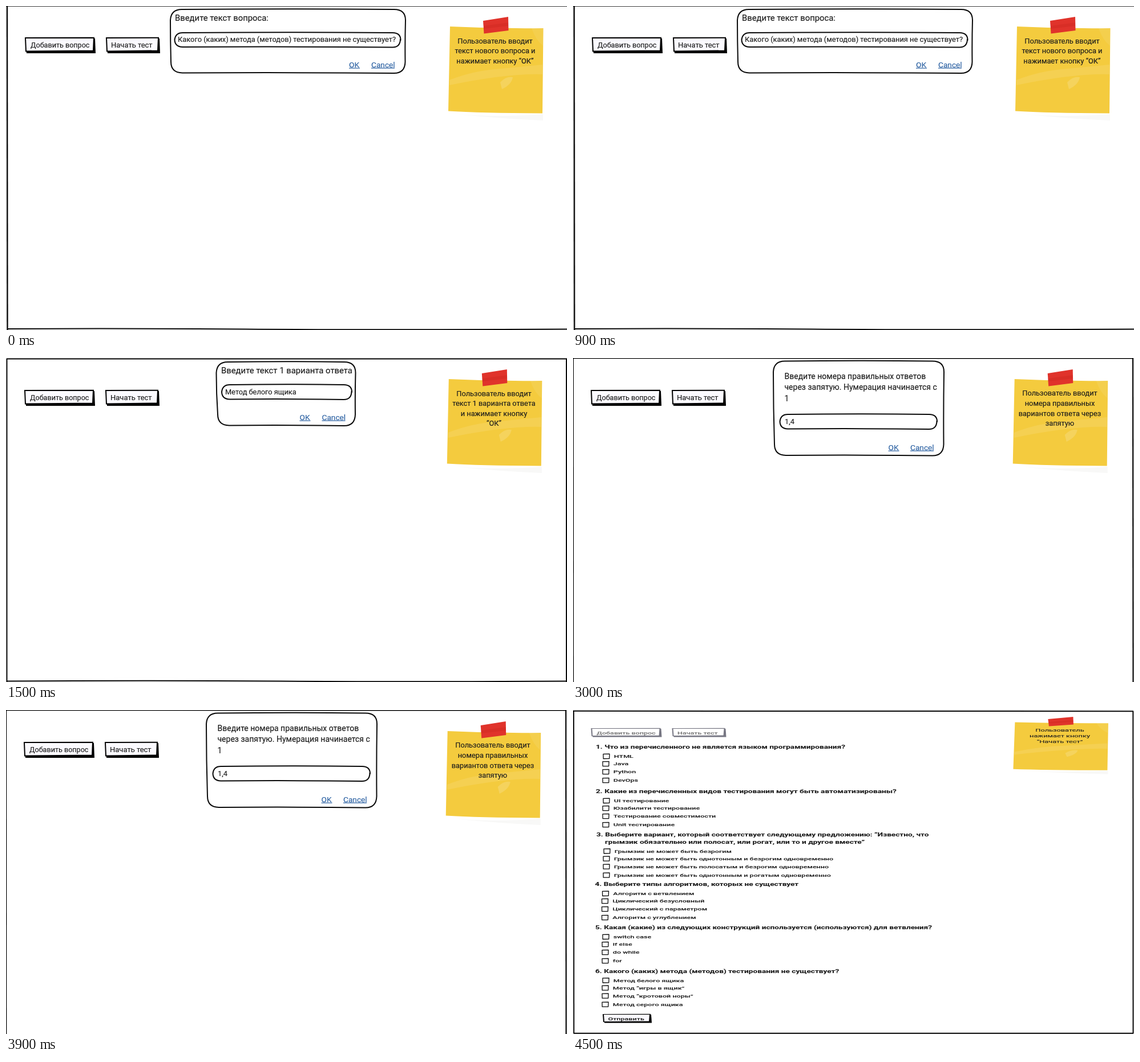
Animation of 983 by 569 pixels, one loop 6 s. Source, as an HTML page:

```html
<!DOCTYPE html>
<html lang="ru">
<head>
<meta charset="utf-8">
<title>Создание теста</title>
<style>
  html, body { margin: 0; width: 100%; height: 100%; overflow: hidden; background: #fff; }
  svg { display: block; width: 100%; height: 100%; }
  text { font-family: Roboto, "Open Sans", sans-serif; font-size: 12.8px; fill: #1c1c1c; stroke: #1c1c1c; stroke-width: .15px; white-space: pre; }
  .scene { visibility: hidden; animation: show 6s step-end infinite; }
  .scene:nth-of-type(2) { animation-delay: -4.5s; }
  .scene:nth-of-type(3) { animation-delay: -3s; }
  .scene:nth-of-type(4) { animation-delay: -1.5s; }
  @keyframes show { 0% { visibility: visible; } 25%, 100% { visibility: hidden; } }
  .line { fill: none; stroke: #0a0a0a; stroke-width: 2; stroke-linejoin: round; }
  .mid { text-anchor: middle; }
  .link { font-size: 13.7px; fill: #2d62a3; stroke: #2d62a3; }
  .bold { font-size: 13.65px; font-weight: 700; }
  .item { font-size: 12.55px; font-weight: 500; }
  .off { fill: #777; stroke: #777; }
</style>
</head>
<body>
<svg id="stage" viewBox="0 0 983 569" preserveAspectRatio="none"></svg>
<script>
(() => {
const FLAT = 0.553;      // vertical squeeze of the last screen
const FLAT_TEXT = 0.6;

const text = (x, y, s, cls = '', size = 0) =>
  `<text x="${x}" y="${y}" class="${cls}"${size ? ` style="font-size:${size}px"` : ''}>${s}</text>`;

const flatText = (x, y, s, cls) =>
  `<text transform="translate(${x} ${y}) scale(1 ${FLAT_TEXT})" class="${cls}">${s}</text>`;

const line = (d, w = 2) => `<path class="line" d="${d}" style="stroke-width:${w}"/>`;

const poly = (points, fill, extra = '') => `<polygon points="${points}" fill="${fill}" ${extra}/>`;

// Hand-drawn rounded box; lean shifts the lower left corner
function box(x, y, w, h, r, lean = 0) {
  const R = x + w, B = y + h, L = x + lean;
  return line(`M${x + r} ${y + 1} Q${x + w / 2} ${y - .5} ${R - r} ${y + 1}
    Q${R} ${y + 1} ${R} ${y + r} Q${R - 1} ${y + h / 2} ${R - .5} ${B - r}
    Q${R - 1} ${B} ${R - r} ${B} Q${x + w / 2} ${B - 1.5} ${L + r} ${B - .5}
    Q${L} ${B - 1} ${L} ${B - r} Q${x} ${y + h / 2} ${x} ${y + r}
    Q${x + 1} ${y + 1} ${x + r} ${y + 1}Z`);
}

function button(x, y, w, color = '#000', face = '#fbfaff') {
  const R = x + w;
  return poly(`${x + 2},${y + 4} ${R},${y + 2} ${R + 1},${y + 28} ${x + 3},${y + 28}`, color) +
    `<path d="M${x + 1} ${y + 1} L${R - 2} ${y + .7} L${R - 3} ${y + 23.5} L${x + 2} ${y + 24.5}Z"
      fill="${face}" stroke="${color}" stroke-width="2"/>`;
}

const buttons = (color, face) => button(33, 55, 123, color, face) + button(175, 55, 94, color, face);

const labels = text(43, 73, 'Добавить вопрос', '', 12.6) + text(184, 73, 'Начать тест', '', 13);

const note =
  '<path d="M790 190 Q860 196 941 190 L941 201 Q870 198 800 191Z" fill="#f8f8f7"/>' +
  '<path d="M778 36 Q860 40 941.5 39 L940 188.5 Q830 188 775 184.5Z" fill="#f4cb3e"/>' +
  '<path d="M777 130 Q820 113 868 110 L940 103 L940 120 Q880 118 777 139Z" fill="#fff" opacity=".1"/>' +
  '<path d="M866 134 Q876 123 888 125 Q886 138 869 146Z" fill="#fff" opacity=".16"/>' +
  '<path d="M921 39 L941 39 L941 70 Q928 60 921 39Z" fill="#fff" opacity=".08"/>' +
  poly('836,26 880,19 880.5,43 837.5,48.5', '#e0332b') +
  poly('837,35 880,29 880,35 837,40', '#c9251f', 'opacity=".35"');

const shift = (dx, dy, body) => `<g transform="translate(${dx} ${dy})">${body}</g>`;

const squeeze = (dx, dy, body) =>
  `<g transform="matrix(1 0 0 ${FLAT} ${dx} ${dy})">${body}</g>`;

const header = (dx, noteDx, dy) =>
  shift(dx, dy, buttons() + labels) + shift(noteDx, dy, note);

const lines = (x, y, step, rows) =>
  rows.map((s, i) => text(x, y + i * step, s, 'mid')).join('');

const links = (x, x2, y) => [[x, 'OK', 19], [x2, 'Cancel', 41]].map(([at, s, w]) =>
  text(at, y, s, 'link') +
  `<path d="M${at} ${y + 1.7}h${w}" stroke="#2d62a3" stroke-width="1.2"/>`).join('');

const scene = body => `<g class="scene">${body}</g>`;

const ask = scene(
  line('M2 0 Q1 280 2.5 569', 2.4) + line('M0 .3 H983', 1) +
  line('M2 567 Q200 566 420 567.5 T983 567.5') +
  header(0, 0, 0) +
  lines(857, 65.5, 17.6, ['Пользователь вводит', 'текст нового вопроса и', 'нажимает кнопку “ОК”']) +
  box(288, 5, 412, 113, 20, 1) + box(295.5, 46, 396, 26.5, 14) +
  text(296, 25.5, 'Введите текст вопроса:', '', 14.85) +
  text(301, 63, 'Какого (каких) метода (методов) тестирования не существует?', '', 12.85) +
  links(601, 640, 107.5));

const answer = scene(
  line('M1.5 1 Q.5 280 1.5 569') + line('M1 1.5 Q500 .5 983 1.5') +
  line('M982 1 Q981.5 300 982 569') + line('M1 567.5 Q240 566 480 567.5 T983 567.5') +
  header(-1, -2.2, 1) +
  lines(855, 66.5, 17.6, ['Пользователь вводит', 'текст 1 варианта ответа', 'и нажимает кнопку', '“ОК”']) +
  box(368.5, 6, 244, 113, 20, 2.5) + box(378, 46, 228, 27, 14) +
  text(377, 26.5, 'Введите текст 1 варианта ответа', '', 14.85) +
  text(384, 63.5, 'Метод белого ящика') +
  links(514.5, 553.5, 108.5));

const numbers = scene(
  line('M.5 0 Q0 280 .7 569', 1.2) + line('M0 .6 Q500 0 982 .8', 1.4) +
  line('M981 0 Q980.5 300 981.5 569', 2.2) +
  header(-2, -4.3, 1) +
  lines(853, 66, 17.8, ['Пользователь вводит', 'номера правильных', 'вариантов ответа через', 'запятую']) +
  box(351, 4.5, 299, 167, 20, 2) + box(362.5, 98, 275.5, 27, 14) +
  ['Введите номера правильных ответов', 'через запятую. Нумерация начинается с', '1']
    .map((s, i) => text(370.5, 37 + i * 19.4, s, '', 14)).join('') +
  text(371, 115.5, '1,4') +
  links(552.5, 591, 161.5));

// [x, y of the first row, question rows, answers]
const quiz = [
  [40, 65, ['1. Что из перечисленного не является языком программирования?'],
    ['HTML', 'Java', 'Python', 'DevOps']],
  [40, 143, ['2. Какие из перечисленных видов тестирования могут быть автоматизированы?'],
    ['UI тестирование', 'Юзабилити тестирование', 'Тестирование совместимости', 'Unit тестирование']],
  [41, 219, ['3. Выберите вариант, который соответствует следующему предложению: “Известно, что',
    'грымзик обязательно или полосат, или рогат, или то и другое вместе”'],
    ['Грымзик не может быть безрогим', 'Грымзик не может быть однотонным и безрогим одновременно',
      'Грымзик не может быть полосатым и безрогим одновременно',
      'Грымзик не может быть однотонным и рогатым одновременно']],
  [38.5, 306, ['4. Выберите типы алгоритмов, которых не существует'],
    ['Алгоритм с ветвлением', 'Циклический безусловный', 'Циклический с параметром', 'Алгоритм с углублением']],
  [39, 382, ['5. Какая (какие) из следующих конструкций используется (используются) для ветвления?'],
    ['switch case', 'if else', 'do while', 'for']],
  [39, 458.5, ['6. Какого (каких) метода (методов) тестирования не существует?'],
    ['Метод белого ящика', 'Метод “игры в ящик”', 'Метод “кротовой норы”', 'Метод серого ящика']]
];
const drops = [16, 29.2, 43.2, 58.2];

function question([x, y, rows, answers]) {
  const base = y + (rows.length - 1) * 12.5;
  return rows.map((s, i) => flatText(x + i * 15, y + 3 + i * 12.5, s, 'bold')).join('') +
    answers.map((s, i) => {
      const cy = base + drops[i], left = x + (i ? 12 : 13);
      return line(`M${left} ${cy - 3.6} l11 -.3 l-.3 8.2 l-10.5 .2Z`, 1.3) +
        flatText(left + 18.8, cy + 3, s, 'item');
    }).join('');
}

const exam = scene(
  line('M1.2 2 Q.5 280 1.5 568') + line('M0 1.8 Q500 1 982 2.2') +
  line('M981.3 2 Q981 300 981.5 568') + line('M1 567.7 Q500 567 982 567.8') +
  squeeze(-1.5, 1.6, buttons('#777783', '#fff')) + squeeze(-3.6, 1.6, note) +
  flatText(41.5, 43, 'Добавить вопрос', 'item off') + flatText(183, 43, 'Начать тест', 'item off') +
  ['Пользователь', 'нажимает кнопку', '“Начать тест”']
    .map((s, i) => flatText(853, 38 + i * 10.1, s, 'mid')).join('') +
  quiz.map(question).join('') +
  squeeze(19, 503.5, button(33, 55, 85)) +
  flatText(61.5, 544.8, 'Отправить', 'item'));

document.getElementById('stage').innerHTML = ask + answer + numbers + exam;
})();
</script>
</body>
</html>
```
